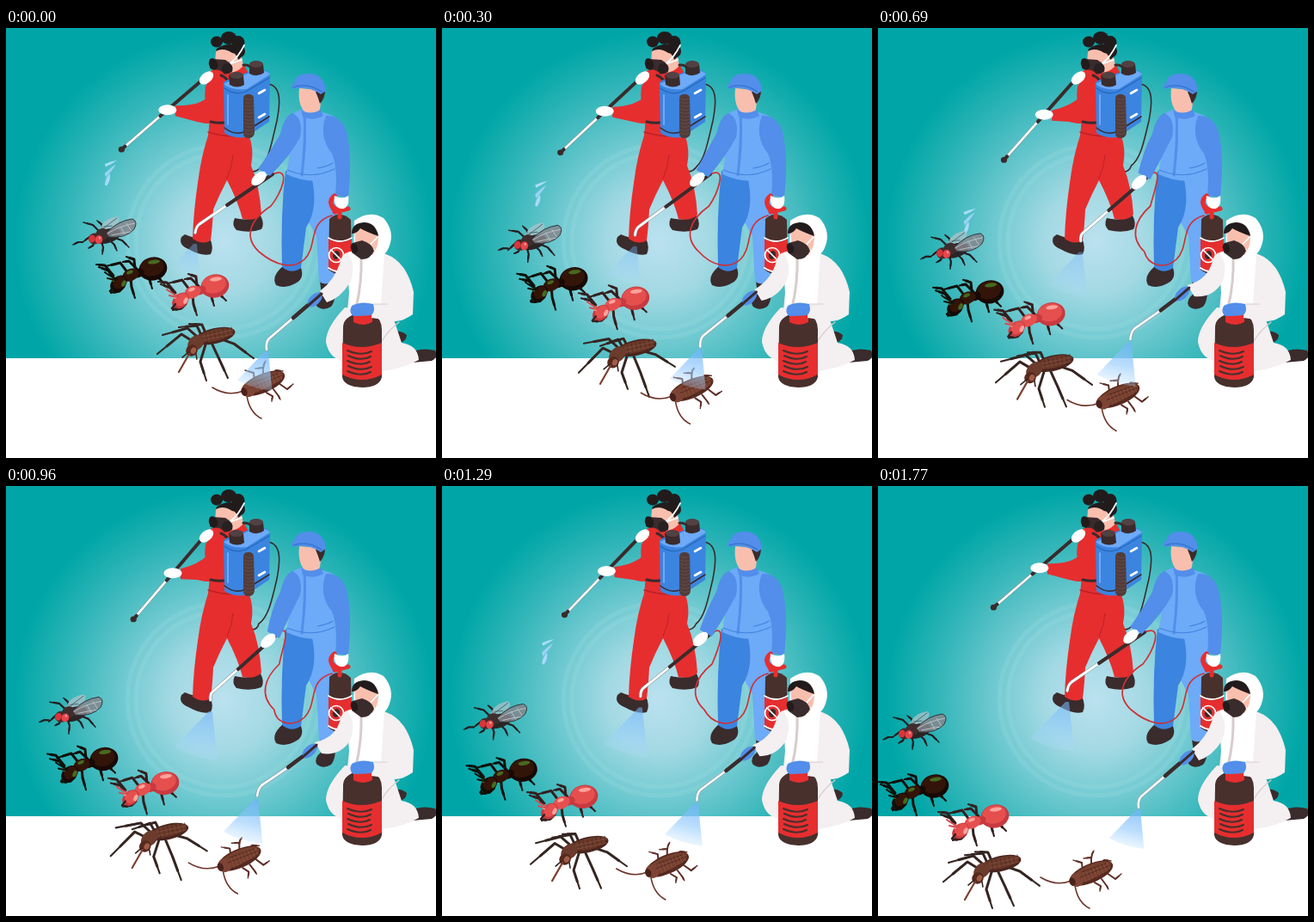
These frames come from a looping animation (500 by 500 pixels, 1.8 s). An HTML page with a canvas:

```html
<!DOCTYPE html>
<html lang="en">
<head>
<meta charset="utf-8">
<title>Pest control</title>
<style>
html, body { margin: 0; width: 100%; height: 100%; overflow: hidden; background: #fff; }
canvas { display: block; width: 500px; height: 500px; }
</style>
</head>
<body>
<canvas id="stage" width="500" height="500"></canvas>
<script>
const ctx = document.getElementById('stage').getContext('2d');
const LOOP = 1800;
const INK = '#3a2b2c', BROWN = '#48302d', BLACK = '#171515', HAIR = '#221b1c', RED = '#e62e2f', DEEP = '#bf2026',
  SKIN = '#f9bfae', BLUE = '#528eea', DARKBLUE = '#3b84e0', LIGHTBLUE = '#6daaf8', WHITE = '#fff',
  SUIT = '#f4eff0', SHADE = '#d8cccc';

const mix = (a, b, k) => a + (b - a) * k;
const mixPt = (a, b, k) => [mix(a[0], b[0], k), mix(a[1], b[1], k)];

function fill(d, color) {
  ctx.fillStyle = color;
  ctx.fill(new Path2D(d));
}
function line(d, color, w) {
  ctx.strokeStyle = color;
  ctx.lineWidth = w;
  ctx.stroke(new Path2D(d));
}
function seg(a, b, color, w) {
  line(`M${a}L${b}`, color, w);
}
function oval(x, y, rx, ry, color, deg = 0) {
  ctx.beginPath();
  ctx.ellipse(x, y, rx, ry, deg * Math.PI / 180, 0, 7);
  ctx.fillStyle = color;
  ctx.fill();
}
function ring(x, y, r, color, w) {
  ctx.beginPath();
  ctx.arc(x, y, r, 0, 7);
  ctx.strokeStyle = color;
  ctx.lineWidth = w;
  ctx.stroke();
}
function glove(x, y, deg, color) {
  oval(x, y, 10.5, 6, color, deg);
}

function backdrop() {
  ctx.fillStyle = WHITE;
  ctx.fillRect(0, 0, 500, 500);
  const g = ctx.createRadialGradient(253, 248, 0, 253, 248, 243);
  g.addColorStop(0, '#bbe1ef');
  g.addColorStop(.25, '#a3d9e3');
  g.addColorStop(.5, '#6cc8cf');
  g.addColorStop(.75, '#34b6b9');
  g.addColorStop(1, '#00a6a7');
  ctx.fillStyle = g;
  ctx.fillRect(0, 0, 500, 384);
  ctx.globalAlpha = .08;
  for (const r of [112, 102]) ring(253, 248, r, '#e4f8ff', 5);
  ctx.globalAlpha = 1;
}

function redWorker(p) {
  const bow = mix(0, -4, p);
  line(`M305 65C322 68 318 92 315 108C310 128 306 152 ${298 + bow} 160Q292 168 284 167`, INK, 1.6);
  // boots and legs
  fill('M266 221Q280 225 296 218Q301 228 297 234Q284 239 268 235Q262 229 266 221Z', INK);
  fill('M208 240Q224 247 237 244Q242 256 238 263Q228 266 212 257Q200 252 204 243Z', INK);
  fill('M236 122L282 124Q289 140 285 160Q295 184 297 217Q290 225 275 222Q270 202 257 177Q248 194 241 211Q240 232 238 247Q229 253 217 245Q218 213 223 180Q227 148 236 122Z', RED);
  line('M257 175Q263 162 264 148', DEEP, 1);
  // torso
  fill('M240 54Q252 45 276 42L288 64L284 128Q260 133 235 126L237 104Q229 86 232 68Z', RED);
  line('M235 121Q257 128 281 125', DEEP, 1.5);
  // head
  fill('M244 27Q260 19 273 28L276 44Q266 55 252 51L243 44Z', SKIN);
  fill('M245 24Q260 14 276 24Q278 32 270 37Q268 29 263 29Q253 22 244 27Z', HAIR);
  oval(245, 16, 7, 6.5, HAIR);
  oval(259, 11.5, 9, 7.5, HAIR);
  oval(270, 17, 7.5, 8, HAIR);
  oval(272, 27, 6, 7, HAIR);
  line('M277 20Q270 34 261 41M274 37L260 42', WHITE, 1.7);
  fill('M240 36L255 37Q266 43 263 51Q252 57 246 50L237 47Z', INK);
  oval(241, 42, 5, 7, HAIR, -18);
  oval(257, 47, 6, 6, '#282122', 20);
  // lance swings around the upper hand
  const ang = mix(139.3, 130.4, p) * Math.PI / 180;
  const at = r => [231 + Math.cos(ang) * r, 58 + Math.sin(ang) * r];
  const tip = at(127.5), grip = at(57);
  const [x, y] = grip;
  seg(at(68), tip, '#7b8c92', 3.6);
  seg(at(68), tip, WHITE, 2.6);
  seg(at(5), at(68), INK, 4);
  seg(at(122), tip, INK, 4);
  oval(...tip, 3.6, 3.4, INK);
  fill(`M${x + 9} ${y - 5}Q224 91 235 80Q248 78 254 96L252 108Q240 114 222 109L${x + 9} ${y + 7}Z`, RED);
  line('M238 109Q246 111 253 110', INK, 3);
  glove(x, y, 0, WHITE);
  fill('M236 51Q247 45 254 54L246 69L236 68Z', RED);
  oval(233, 58, 9.5, 6, WHITE, -40);
  // tank
  line('M276 43Q286 42 286 52M250 55Q257 58 260 65', INK, 3);
  fill('M253 66Q252 62 258 60L288 49Q304 47 307 54L306 109L279 127Q263 129 254 122Z', DARKBLUE);
  fill('M253 65L288 50Q304 48 307 54L280 71Q262 73 253 65Z', LIGHTBLUE);
  line('M254 70Q266 79 279 74L306 58', '#2667b8', 1.2);
  line('M254 116Q266 126 279 120L306 103', INK, 1.5);
  line('M258 78V112', LIGHTBLUE, 2);
  fill('M259 55Q267 49 276 55L277 66Q269 71 260 66Z', INK);
  fill('M283 43Q291 36 299 42L300 52Q292 58 283 53Z', INK);
  oval(268, 55, 8, 4, '#514143');
  oval(291, 42, 8, 4, '#514143');
  line('M294 76L301 72M294 104L301 100', WHITE, 2.6);
  fill('M276 82Q276 77 282 77Q288 77 288 82L289 122Q288 128 282 128Q276 128 276 122Z', '#523c39');
  for (let k = 82; k < 125; k += 4) line(`M277 ${k}Q282 ${k + 3} 288 ${k}`, '#6b5450', .7);
}

function blueWorker(p) {
  // boots and legs
  fill('M322 277Q332 283 343 279Q347 291 338 296Q325 304 314 299Q308 289 322 277Z', INK);
  fill('M365 295L382 294Q385 316 378 324Q368 330 361 323Q358 316 367 309Z', INK);
  fill('M349 170L384 168Q386 203 382 235L383 292Q373 301 364 295L361 242L352 226Z', LIGHTBLUE);
  fill('M325 166L355 172Q364 209 349 232L343 279Q332 287 321 278Q319 217 325 166Z', DARKBLUE);
  // torso and far arm
  fill('M340 96Q352 90 367 98Q386 102 389 112L384 173Q356 184 326 170Q333 138 328 111Q331 98 340 96Z', LIGHTBLUE);
  fill('M372 102Q390 101 396 121Q403 149 398 197L383 195Q386 162 379 146Q363 126 372 102Z', BLUE);
  line('M347 99Q349 130 344 171', BLUE, 3);
  line('M327 165Q355 177 382 164M362 163Q374 161 380 157', '#4585df', 1.2);
  // head
  fill('M341 70L366 72Q367 88 364 98Q356 106 347 97Q339 89 341 70Z', SKIN);
  fill('M360 74L371 72Q371 82 365 88Q363 81 360 74Z', INK);
  fill('M335 64Q337 53 352 53Q370 53 372 73L366 77Q351 67 334 71Q329 67 335 64Z', BLUE);
  line('M334 69Q350 63 367 74', '#3473cb', 1.2);
  fill('M343 95Q353 102 366 95L369 102Q356 109 345 103Z', BLUE);

  // tank and hose
  const left = mix(285, 303, p);
  const hand = mixPt([294, 175], [305, 180], p);
  const butt = mixPt([310, 170], [318, 170], p);
  line(`M${butt}C333 160 320 193 ${mix(308, 318, p)} 207C${left - 3} 224 ${left - 8} 244 ${left + 9} 260C314 277 334 281 347 269C363 253 350 226 379 218`, '#cf3036', 1.7);
  fill('M376 222Q388 211 401 223L402 280Q389 292 375 281Z', BROWN);
  fill('M375 245Q388 253 402 245V279Q388 289 375 280Z', RED);
  line('M375 244Q388 252 402 244M375 279Q388 288 402 278', WHITE, 1.8);
  oval(384, 264, 4, 5, INK, 20);
  ring(384, 264, 8.5, WHITE, 1.7);
  line('M378 258L390 270', WHITE, 1.7);
  line('M388 220V204M381 211Q374 201 382 195M382 214L398 210', RED, 5);
  fill('M382 195Q391 200 398 195Q400 209 390 211Q380 207 382 195Z', WHITE);
  line('M380 206Q386 214 397 211', RED, 3);

  // near arm and lance
  const tip = mixPt([220, 238], [238, 249], p);
  const mid = mixPt([257, 206], [270, 213], p);
  const bend = mixPt([225, 228], [241, 239], p);
  const lance = `M${mid}L${bend}Q${bend[0] - 4} ${bend[1] + 3} ${tip}`;
  line(lance, '#7b8c92', 3.8);
  line(lance, WHITE, 2.8);
  seg(mid, butt, INK, 4);
  const [x, y] = hand;
  fill(`M333 99Q346 105 342 127Q331 148 ${x + 13} ${y - 3}L${x - 1} ${y - 11}Q309 141 319 123Q324 102 333 99Z`, BLUE);
  glove(x, y, -42, WHITE);
  return tip;
}

function whiteWorker(p) {
  fill('M444 354Q458 350 466 357Q466 365 454 367L440 367Z', INK);
  fill('M471 377Q484 371 499 375Q503 383 495 387L473 389Z', INK);
  fill('M394 325Q372 348 372 365Q376 387 398 388L437 399Q462 396 480 386Q479 369 460 366L448 330Z', SUIT);
  line('M437 364Q445 351 457 342', SHADE, 1.2);

  const hand = mixPt([359, 316], [353, 308], p);
  const tip = mixPt([303, 374], [292, 360], p);
  const mid = mixPt([334, 337], [328, 327], p);
  const bend = mixPt([306, 361], [297, 348], p);
  const lance = `M${mid}L${bend}Q${bend[0] - 4} ${bend[1] + 4} ${tip}`;
  line(lance, '#8a9aa0', 3.8);
  line(lance, '#f6fbff', 2.6);
  seg(mid, mixPt([370, 306], [364, 300], p), INK, 4.5);

  fill('M397 261Q420 254 442 263Q466 272 474 307L473 333Q460 343 439 340L435 362Q407 363 395 346L399 308Z', SUIT);
  fill('M397 261Q420 254 440 263L436 322L402 340L399 308Z', WHITE);
  line('M413 265Q414 297 407 325', SHADE, 3);
  // near arm
  const [x, y] = hand;
  fill(`M396 261Q408 274 400 296Q389 314 ${x + 14} ${y + 3}L${x + 6} ${y - 10}Q382 293 388 274Q390 264 396 261Z`, SUIT);
  glove(x, y, -43, BLUE);
  seg([x - 8, y + 7], [x + 8, y - 7], INK, 3);
  // head
  fill('M405 224Q423 211 439 221Q452 236 446 253Q440 271 418 269L404 255Z', WHITE);
  fill('M405 234Q425 227 433 238Q434 255 426 264L407 256Z', SKIN);
  fill('M402 239Q402 227 416 226Q430 226 433 242Q419 237 412 233Q408 239 402 239Z', HAIR);
  line('M432 243L422 254M431 260L422 255', WHITE, 1.7);
  fill('M403 250L414 247Q425 250 428 259Q424 269 413 269L402 261Z', INK);
  oval(405, 256, 4, 6, HAIR, -20);
  // bottle
  fill('M392 350Q391 338 405 333H427Q437 338 437 351V406Q434 418 414 418Q393 417 391 406Z', BROWN);
  fill('M404 331H426V342Q415 348 404 342Z', RED);
  fill('M391 366Q413 376 437 366V403Q414 415 391 403Z', RED);
  for (let k = 0; k < 5; k++) line(`M${397 + k % 2} ${375 + k * 6}Q413 ${382 + k * 6} ${425 - k % 3} ${376 + k * 6}`, BROWN, 2.1);
  fill('M437 311Q447 309 454 317L472 325Q471 340 452 341L425 337L426 321L443 321Z', SUIT);
  line('M443 321L427 321', SHADE, 1);
  fill('M402 323Q413 317 427 321Q430 331 424 334Q412 335 404 335Q398 331 402 323Z', BLUE);
}

// each limb: root, knee, foot
function limbs(list, color, w, amp, t) {
  for (let i = 0; i < list.length; i += 6) {
    const [a, b, c, d, e, f] = list.slice(i, i + 6);
    const lift = amp * (1 - Math.cos(t / 600 * 2 * Math.PI)) / 2 * (i % 12 ? -.5 : 1);
    const knee = d + lift * .3, foot = f + lift;
    line(`M${a} ${b}L${c} ${knee}L${mix(c, e, .6)} ${mix(knee, foot, .6)}`, color, w);
    line(`M${c} ${knee}L${e} ${foot}`, color, w * .7);
  }
}

function fly(t) {
  limbs([36, 284, 25, 286, 17, 292, 17, 292, 12, 292, 6, 295, 37, 280, 29, 272, 18, 269,
    40, 278, 39, 271, 34, 267, 39, 291, 41, 298, 40, 306, 48, 289, 54, 295, 57, 302,
    54, 287, 63, 290, 71, 298, 31, 291, 29, 296, 24, 299], '#241f21', 2.2, 2, t);
  ctx.globalAlpha = .75;
  fill('M36 279Q40 265 57 262Q62 264 58 270Q50 278 39 282Z', '#a9c3c9');
  ctx.globalAlpha = 1;
  line('M37 279L57 264M42 274L51 273', '#405158', .8);
  oval(46, 285, 16, 8, '#2b2425', -17);
  oval(40, 283, 8, 7, '#3d2e2d', -15);
  ctx.globalAlpha = .85;
  fill('M45 281Q58 267 75 265Q82 268 77 277Q67 288 48 286Z', '#84878d');
  ctx.globalAlpha = 1;
  line('M46 282Q60 273 78 270M51 284Q63 281 73 280M61 274L67 284M68 270L74 279', '#b9c0c5', 1);
  line('M45 281Q58 267 75 265Q82 268 77 277Q67 288 48 286', '#30363c', 1);
  oval(31, 288, 7, 6.5, '#472a2b');
  oval(28, 288, 3.8, 4.5, '#d8353a', 15);
  oval(36, 289, 4.3, 5, '#e6454c', 15);
  oval(37, 287, 1.2, 1.5, '#ff9a9c');
}

function ant(t, c) {
  limbs([21, 361, 14, 351, 3, 347, 20, 357, 10, 345, 0, 344, 37, 354, 28, 342, 11, 346,
    45, 348, 44, 338, 35, 335, 40, 359, 41, 370, 45, 383, 32, 370, 27, 375, 17, 377,
    49, 356, 61, 358, 65, 372, 51, 350, 68, 355, 79, 366, 47, 349, 38, 340, 31, 341], c.limb, 3, 2, t);
  oval(66, 349, 16.5, 13.5, c.dark, -12);
  oval(65, 347, 14, 10.5, c.body, -12);
  oval(67, 341, 7, 2.4, c.shine, -8);
  oval(49, 354, 7, 5, c.dark, -25);
  oval(40, 356, 10, 7, c.body, -24);
  oval(39, 353, 4, 2, c.shine, -24);
  oval(26, 366, 11, 8, c.dark, -42);
  oval(27, 365, 8.5, 6.5, c.body, -42);
  oval(32, 366, 2.3, 4, c.shine, 25);
  oval(20, 361, 2, 3, c.shine, 20);
  line('M20 370L16 375L22 376', c.limb, 2.4);
  line('M24 361Q15 357 10 353M22 362L13 360', c.feeler, 2);
}

function mosquito(t) {
  limbs([120, 447, 104, 437, 76, 460, 125, 442, 111, 430, 82, 438, 128, 440, 122, 427, 101, 429,
    133, 446, 126, 469, 133, 491, 140, 449, 148, 466, 158, 488, 151, 443, 165, 448, 188, 465,
    134, 440, 128, 426, 113, 425], '#352622', 3, 8, t);
  oval(143, 439, 24, 9, '#49261e', -13);
  oval(143, 438, 22, 6.5, '#6b3a2b', -13);
  for (let i = 0; i < 8; i++) line(`M${127 + i * 5} ${436 - i}L${129 + i * 5} ${447 - i * 1.4}`, '#4d2a21', .9);
  line('M124 441L164 432M125 445L164 437', '#8a5542', .7);
  oval(121, 447, 11, 8, '#6b3b2c', -42);
  oval(116, 456, 7, 6.5, '#57291f', -40);
  oval(118, 456, 3, 3.8, '#a15c49', 25);
  line('M113 460L101 481', '#7c4131', 2.2);
  line('M112 458L105 464M121 460L122 466', '#38231f', 1.6);
}

function roach(t) {
  limbs([238, 447, 237, 438, 227, 435, 248, 441, 248, 432, 239, 433, 248, 433, 249, 428, 251, 424,
    258, 439, 263, 435, 271, 436, 252, 461, 259, 465, 258, 471, 260, 457, 266, 465, 268, 469,
    266, 450, 276, 457, 283, 451], '#5e2f27', 2, 2, t);
  line('M225 459Q207 466 189 455M229 464Q232 484 246 491', '#6e352a', 1.6);
  oval(248, 450, 27, 11, '#57291f', -23);
  oval(248, 449, 25, 8.5, '#75402f', -23);
  oval(231, 458, 8, 8, '#7d4435', -20);
  oval(226, 460, 3.5, 5, '#4b211b', -20);
  line('M235 455L270 441M239 463L271 446M237 449L265 439', '#4f261d', 1);
  for (let i = 0; i < 8; i++) line(`M${238 + i * 4} ${449 - i * 1.6}L${242 + i * 4} ${460 - i * 2}`, '#9a5849', .6);
}

function crawl(draw, dx, dy, t, look, ox = 0, oy = 0) {
  const k = 1 - t / 1770;
  ctx.save();
  ctx.translate(ox + dx * k, oy + dy * k);
  draw(t, look);
  ctx.restore();
}

const DARK_ANT = { limb: '#11110b', feeler: '#11110b', dark: '#170905', body: '#331409', shine: '#47691f' };
const RED_ANT = { limb: '#33201f', feeler: '#d44d51', dark: '#c83a40', body: '#e5504f', shine: '#ffa39c' };

function cone(x, y, len, alpha) {
  const g = ctx.createLinearGradient(x, y, x - len * .25, y + len);
  g.addColorStop(0, `rgba(110,178,250,${alpha})`);
  g.addColorStop(.55, `rgba(150,204,253,${alpha * .85})`);
  g.addColorStop(1, `rgba(185,222,255,${alpha * .3})`);
  fill(`M${x - 2} ${y}L${x - len * .74} ${y + len * .73}Q${x - len * .35} ${y + len * .95} ${x + len * .14} ${y + len}L${x + 2} ${y}Z`, g);
}

function jet(t) {
  const second = t >= 990;
  const age = second ? t - 990 : t;
  if (age > (second ? 740 : 880)) return;
  ctx.save();
  ctx.translate((second ? 130 : 122) - age * .022, 168 + age * .081);
  ctx.scale(1.2, 1.1);
  fill('M-6 -9Q0 -12 6 -13Q1 -9 -5 -6Z', '#a9def8');
  fill('M-6 1Q-1 -5 5 -9Q2 -3 -5 5Z', '#9bd2f6');
  fill('M-6 13Q-5 5 -1 1Q0 8 -4 14Z', '#a9d9fa');
  ctx.restore();
}

function draw(t) {
  const p = (1 - Math.cos(t / LOOP * 2 * Math.PI)) / 2;
  ctx.lineCap = ctx.lineJoin = 'round';
  backdrop();
  redWorker(p);
  const tip = blueWorker(p);
  whiteWorker(p);
  jet(t);
  cone(tip[0], tip[1] + 13, mix(38, 58, Math.min(1, t / 1000)), t < 800 ? .4 : .6);
  crawl(fly, 72, -43, t);
  crawl(ant, 105, -69, t, DARK_ANT);
  crawl(ant, 107, -84, t, RED_ANT, 70, 35);
  crawl(mosquito, 100, -81, t);
  crawl(roach, 51, -37, t);
  cone(mix(303, 291, p), mix(376, 364, p), mix(46, 52, p), .75);
}

function tick() {
  draw(performance.now() % LOOP);
  requestAnimationFrame(tick);
}
tick();
</script>
</body>
</html>
```
